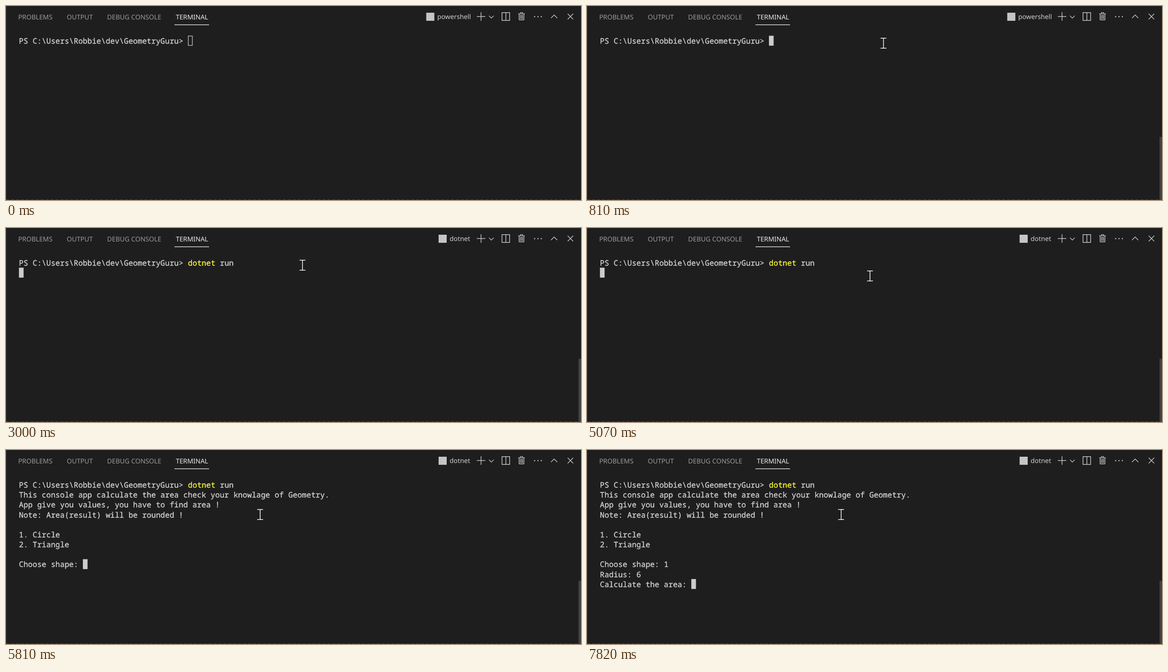
Write an HTML page that moves like this. It is 1280 px wide and 433 px high and loops after 8000 ms.

```html
<!DOCTYPE html>
<html lang="en">
<head>
<meta charset="utf-8">
<title>Terminal session</title>
<style>
  html, body { margin: 0; width: 100%; height: 100%; overflow: hidden; background: #1e1e1e; }
  svg { display: block; width: 100%; height: 100%; }
  text { white-space: pre; text-rendering: geometricPrecision; }
  .ui { font: 14.7px "Noto Sans", "Open Sans", sans-serif; fill: #9a9a9a; }
  .ui .active { fill: #ececec; }
  .shell { font: 14.6px "Noto Sans", "Open Sans", sans-serif; fill: #d0d0d0; }
  .term {
    font: 16.95px "Noto Sans Mono", "DejaVu Sans Mono", monospace;
    color: #d2d2d2; fill: currentColor; stroke: currentColor; stroke-width: .35;
  }
  .icons { fill: none; stroke: #c8c8c8; stroke-width: 1.5; }
</style>
</head>
<body>
<svg viewBox="0 0 1280 433">
  <rect width="1280" height="433" fill="#1e1e1e"/>
  <path d="M.5 0V433" stroke="#303030"/>
  <path d="M0 432.5H1280" stroke="#505050" stroke-dasharray="7 4"/>

  <g class="ui">
    <text x="27.2" y="30.3">PROBLEMS</text>
    <text x="135.2" y="30.3">OUTPUT</text>
    <text x="225" y="30.3">DEBUG CONSOLE</text>
    <text x="378" y="30.3" class="active">TERMINAL</text>
    <rect x="375" y="41.2" width="77" height="1.4" class="active"/>
  </g>

  <g class="shell">
    <rect id="badge" y="15" width="18" height="18" fill="#c5c5c5"/>
    <text id="shell" y="29.3"></text>
  </g>

  <g class="icons">
    <path d="M1048 23.5H1067M1057.5 14V33"/>
    <path d="M1075.2 21.8L1080.4 27L1085.6 21.8" stroke-width="1.3"/>
    <path d="M1104.2 14.7H1121.2V32.2H1104.2ZM1112.7 14.7V32.2"/>
    <path transform="translate(1137.4 12.6) scale(1.36)" stroke-width="1"
      d="M2 3.5H13M5.5 3.5V2L6 1.5H9L9.5 2V3.5M3.5 3.5V13L4 13.5H11L11.5 13V3.5M5.5 5V12M7.5 5V12M9.5 5V12"/>
    <path d="M1176.8 23.8h.01M1184.2 23.8h.01M1191.6 23.8h.01" stroke-width="2.8" stroke-linecap="round"/>
    <path d="M1213.2 27L1220.2 20L1227.2 27"/>
    <path d="M1250.3 17.3L1262.7 29.7M1262.7 17.3L1250.3 29.7"/>
  </g>

  <rect id="bar" x="1274.5" y="292" width="5.5" height="141" fill="#424242"/>
  <g id="lines" class="term"></g>
  <rect id="caret" stroke="#ccc" stroke-width="1.3"/>

  <g id="mouse">
    <circle id="click" cx="-3" cy="-1.5" r="16.7" fill="#ff0" fill-opacity=".47"/>
    <path d="M-6.5-11.2H6.5M0-11.2V11.2M-6.5 11.2H6.5" fill="none" stroke="#fff" stroke-width="1.5"/>
  </g>
</svg>
<script>
const LOOP = 8000, LEFT = 28.8, TOP = 66.4, COL = 10.17, ROW = 22.16;
const $ = id => document.getElementById(id);

// time shown, column, row, text, colour
const lines = [
  [0, 0, 0, "PS C:\\Users\\Robbie\\dev\\GeometryGuru>"],
  [2080, 37, 0, "dotnet", "#f9f936"],
  [2080, 44, 0, "run"],
  [5810, 0, 1, "This console app calculate the area check your knowlage of Geometry."],
  [5810, 0, 2, "App give you values, you have to find area !"],
  [5810, 0, 3, "Note: Area(result) will be rounded !"],
  [5810, 0, 5, "1. Circle"],
  [5810, 0, 6, "2. Triangle"],
  [5810, 0, 8, "Choose shape:"],
  [7680, 14, 8, "1"],
  [7820, 0, 9, "Radius: 6"],
  [7820, 0, 10, "Calculate the area:"]
];

// time, column, row
const carets = [
  [0, 37, 0], [2080, 47, 0], [2670, 0, 1],
  [5810, 14, 8], [7680, 15, 8], [7820, 20, 10]
];

// time, x, y
const moves = [
  [130, 674, 57], [200, 667, 69], [270, 662, 78], [340, 660, 83],
  [5070, 630, 107], [5140, 590, 130], [5210, 565.7, 144]
];

const latest = (steps, t) => steps.filter(s => s[0] <= t).pop();
const within = (t, from, to) => t >= from && t < to;
const show = (el, on) => el.setAttribute("display", on ? "inline" : "none");

function set(el, attrs) {
  for (const name in attrs) el.setAttribute(name, attrs[name]);
}

const texts = lines.map(([, col, row, str, color]) => {
  const el = document.createElementNS("http://www.w3.org/2000/svg", "text");
  set(el, { x: LEFT + col * COL, y: TOP + row * ROW + 17.7 });
  if (color) el.style.color = color;
  el.textContent = str;
  $("lines").appendChild(el);
  return el;
});

function render(t) {
  texts.forEach((el, i) => show(el, t >= lines[i][0]));

  const [, col, row] = latest(carets, t);
  set($("caret"), {
    x: LEFT + col * COL + 0.65, y: TOP + row * ROW + 0.65,
    width: COL - 1.1, height: ROW - 1.3,
    fill: t < 620 ? "none" : "#ccc"
  });

  const spot = latest(moves, t);
  show($("mouse"), spot);
  if (spot) set($("mouse"), { transform: `translate(${spot[1]} ${spot[2]})` });
  show($("click"), within(t, 550, 810) || within(t, 5410, 5610));

  // the scrollbar fades in with the pointer's first steps
  const step = t < 130 ? 0 : Math.floor((t - 130) / 70) + 1;
  $("bar").setAttribute("opacity", Math.min(1, step / 3));

  const running = t >= 3000;
  $("badge").setAttribute("x", running ? 963 : 935.5);
  $("shell").setAttribute("x", running ? 987.6 : 960);
  $("shell").textContent = running ? "dotnet" : "powershell";
}

const start = performance.now();
function tick() {
  render((performance.now() - start) % LOOP);
  requestAnimationFrame(tick);
}
tick();
</script>
</body>
</html>
```
